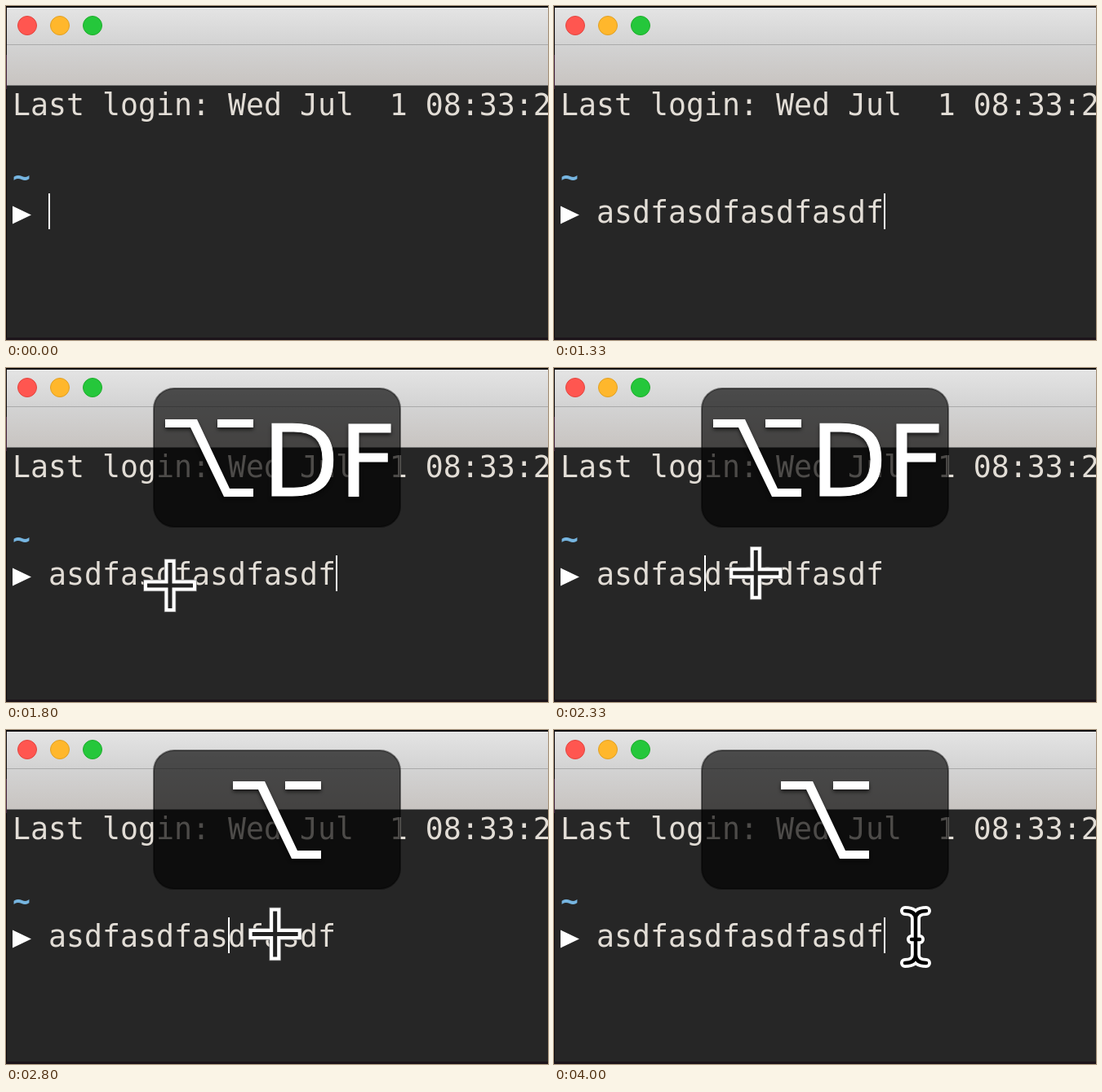
Write an HTML page that moves like this. It is 664x410 px and loops after 4070 ms.

```html
<!DOCTYPE html>
<html lang="en">
<head>
<meta charset="utf-8">
<title>Option-click in a terminal</title>
<style>
  html, body { margin: 0; height: 100%; overflow: hidden; background: #000; }
  svg { display: block; width: 664px; height: 410px; }
  .term { font: 36.54px "DejaVu Sans Mono", monospace; fill: #e2ddd6; white-space: pre; }
  .keys { fill: #fff; filter: drop-shadow(0 3px 2px rgba(0, 0, 0, .6)); }
  .keys text { font: 122px "DejaVu Sans", sans-serif; stroke: #fff; }
</style>
</head>
<body>
<svg viewBox="0 0 664 410">
  <defs>
    <linearGradient id="bar" x2="0" y2="1">
      <stop stop-color="#e4e4e4"/><stop offset="1" stop-color="#d3d3d3"/>
    </linearGradient>
    <linearGradient id="tabs" x2="0" y2="1">
      <stop stop-color="#d3d3d3"/><stop offset="1" stop-color="#c8c4c1"/>
    </linearGradient>
    <path id="plus" d="M-4.5-30H4.5V-4.5H30V4.5H4.5V30H-4.5V4.5H-30V-4.5H-4.5Z"/>
    <path id="beam" d="M-13-32Q0-32 0-22Q0-32 13-32M0-22V22M-13 32Q0 32 0 22Q0 32 13 32M-5 3H5"/>
  </defs>

  <rect width="664" height="410" fill="#0c080b"/>
  <rect y="60" width="1" height="42" fill="#42203c"/>
  <rect x="1" y="2" width="663" height="45" fill="url(#bar)"/>
  <rect x="1" y="47" width="663" height="1" fill="#aaa"/>
  <rect x="1" y="48" width="663" height="49" fill="url(#tabs)"/>
  <rect x="1" y="97" width="663" height="1" fill="#777"/>
  <rect x="1" y="98" width="663" height="309" fill="#262626"/>
  <rect y="407" width="664" height="3" fill="#1c141a"/>
  <circle cx="26" cy="24" r="11.5" fill="#ff5650" stroke="#e2453f"/>
  <circle cx="66" cy="24" r="11.5" fill="#ffb72c" stroke="#e0a024"/>
  <circle cx="106" cy="24" r="11.5" fill="#25c73b" stroke="#1dad2b"/>

  <g class="term">
    <text x="8" y="134" xml:space="preserve">Last login: Wed Jul  1 08:33:2</text>
    <text x="8" y="222" style="fill:#76b5e0;font-weight:bold">~</text>
    <path d="M8 245.5L31 256.5L8 267.5Z" fill="#fff"/>
    <text x="52" y="266" id="typed"></text>
  </g>
  <rect id="caret" y="230" width="2" height="44" fill="#fff"/>

  <g id="overlay">
    <rect x="181" y="25" width="302" height="170" rx="25" fill="#000" fill-opacity=".66" stroke="#000" stroke-opacity=".45" stroke-width="2"/>
    <g class="keys">
      <path id="option" d="M278 63H317L357 148H386V158H350L309 73H278ZM342 63H386V73H342Z"/>
      <text id="letters" x="314" y="157">DF</text>
    </g>
  </g>

  <g id="cross">
    <use href="#plus" fill="none" stroke="#777" stroke-width="5.5"/>
    <use href="#plus" fill="#222" stroke="#fff" stroke-width="4"/>
  </g>
  <g id="ibeam" fill="none" stroke-linecap="round" stroke-linejoin="round">
    <use href="#beam" stroke="#fff" stroke-width="12"/>
    <use href="#beam" stroke="#000" stroke-width="4.5"/>
  </g>
</svg>
<script>
const $ = id => document.getElementById(id);
const LOOP = 4070, TEXT = "asdf".repeat(4);

// Ticks run at 15 per second; each list holds [first tick, value].
const TYPED = [[0, 0], [4, 1], [5, 2], [6, 3], [7, 4], [9, 6], [10, 7], [11, 8],
  [14, 9], [15, 10], [16, 12], [18, 13], [19, 15], [20, 16]];
const CARET = [[20, 16], [32, 6], [40, 10], [47, 13], [54, 16]];
const OVERLAY_ON = 24, LETTERS_OFF = 36;

const easeOut = power => p => 1 - (1 - p) ** power;
const smooth = p => p * p * (3 - 2 * p);
const smoother = p => p ** 3 * (10 + p * (6 * p - 15));

const MOVES = [
  { start: 22, show: 22, end: 29, hide: 30, from: [221, 353], to: [198, 254], ease: easeOut(1.62) },
  { start: 32, show: 33, end: 37, hide: 38, from: [198, 254], to: [274, 250.5], ease: smooth },
  { start: 40, show: 41, end: 45, hide: 46, from: [274, 250.5], to: [345, 250.5], ease: easeOut(3) },
  { start: 47, show: 48, end: 50, hide: 53, from: [345, 250.5], to: [407, 250.5], ease: smoother },
  { start: 60, show: 60, end: 61, hide: 62, from: [443, 254], to: [443, 254], ease: smooth },
];

const valueAt = (steps, tick) => steps.filter(([first]) => first <= tick).pop()[1];
const show = (id, on) => $(id).setAttribute("visibility", on ? "inherit" : "hidden");

function draw(ms) {
  const tick = Math.floor((Math.floor(ms / 10) + 0.5) * 0.15);
  const typed = valueAt(TYPED, tick);
  $("typed").textContent = TEXT.slice(0, typed);
  $("caret").setAttribute("x", 52 + 22 * (tick < 20 ? typed : valueAt(CARET, tick)));

  const letters = tick < LETTERS_OFF;
  show("overlay", tick >= OVERLAY_ON);
  show("letters", letters);
  $("option").setAttribute("transform", `translate(${letters ? -83 : 0})`);

  const move = MOVES.find(m => tick >= m.show && tick < m.hide);
  const beam = tick < OVERLAY_ON || tick >= 60;
  show("cross", move && !beam);
  show("ibeam", move && beam);
  if (move) {
    const p = move.ease(Math.min(1, (tick - move.start) / (move.end - move.start)));
    const [x, y] = move.from.map((a, i) => a + (move.to[i] - a) * p);
    $(beam ? "ibeam" : "cross").setAttribute("transform", `translate(${x} ${y})`);
  }
}

const began = performance.now();
function frame() {
  draw((performance.now() - began) % LOOP);
  requestAnimationFrame(frame);
}
frame();
</script>
</body>
</html>
```
